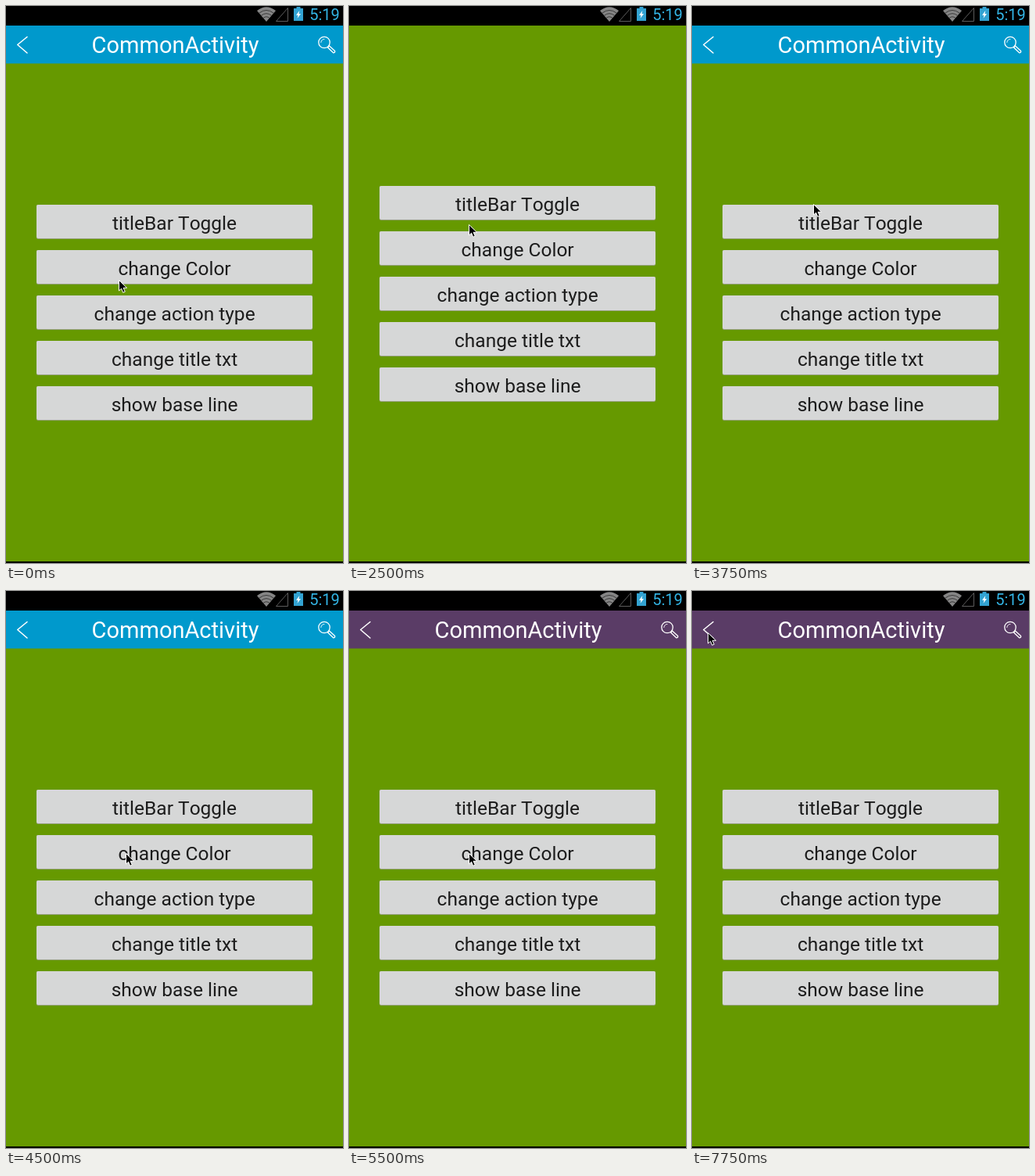
These frames come from a looping animation (431 px wide and 712 px high, 8000 ms). An HTML page:

```html
<!DOCTYPE html>
<html lang="en">
<head>
<meta charset="utf-8">
<title>Title bar demo</title>
<style>
  html, body { margin: 0; width: 100%; height: 100%; overflow: hidden; background: #000; }
  svg { display: block; width: 431px; height: 712px; }
  text { font-family: Roboto, sans-serif; font-kerning: none; text-anchor: middle; }
  .line { fill: none; stroke: #fff; stroke-linecap: round; stroke-linejoin: round; }
</style>
</head>
<body>
<svg viewBox="0 0 431 712">
  <rect width="431" height="712" fill="#000"/>
  <rect y="25" width="431" height="685" fill="#690"/>

  <g id="status">
    <path d="M333 20 L321 6 Q333 -3.5 345 6 Z" fill="#858585"/>
    <g id="waves" fill="none" stroke="#333" stroke-width="0.9"></g>
    <path d="M345.5 19.5 H360.5 V2.5 Z" fill="none" stroke="#5c5c5c"/>
    <path d="M371.5 1 h5 v2 h3.5 v16 h-12 v-16 h3.5 z" fill="#33a3d2"/>
    <path d="M375.3 6 L371 11.7 H373.5 L372.6 15.8 L377 10 H374.5 Z" fill="#fff"/>
    <text x="407.5" y="18" font-size="20" fill="#33b5e5">5:19</text>
  </g>

  <g id="bar">
    <rect id="fill" y="25" width="431" height="48.5"/>
    <path class="line" stroke-width="1.6" d="M27 39.5 L14.8 49.5 L27 60"/>
    <text x="216.5" y="60" font-size="29" fill="#fff">CommonActivity</text>
    <g class="line" stroke-width="1.3">
      <circle cx="407" cy="46.5" r="7.2"/>
      <path d="M402.8 46.5 A4.2 4.2 0 0 1 407 42.3" stroke-width="0.9"/>
      <path d="M411.5 53 L413.5 51 L420.6 57.5 Q421 59.8 418.6 59.8 Z"/>
    </g>
  </g>

  <g id="list"></g>

  <path id="cursor" d="M0.5 0.5 V14 L3.6 11.2 L5.7 16.3 L8.3 15.2 L6.1 10.3 H10.6 Z"
        fill="#000" stroke="#fff"/>
</svg>
<script>
const LOOP = 8000, TICK = 250;
const $ = id => document.getElementById(id);

// Fan stripes shrink evenly towards the apex.
$('waves').innerHTML = [1, 2, 3].map(i => {
  const half = 12 - 2.7 * i, y = 6 + 3.1 * i;
  return `<path d="M${333 - half} ${y} Q333 ${y - half * 0.78} ${333 + half} ${y}"/>`;
}).join('');

const labels = ['titleBar Toggle', 'change Color', 'change action type', 'change title txt', 'show base line'];
$('list').innerHTML = labels.map((label, i) => {
  const y = 254 + i * 58;
  return `<rect x="39" y="${y}" width="353" height="44" rx="2" fill="#96a07d"/>
    <rect x="39" y="${y}" width="353" height="43" rx="2" fill="#d6d7d7"/>
    <text x="215.6" y="${y + 32}" font-size="24.5" fill="#1c1c1c">${label}</text>`;
}).join('');

const easeIn = u => u ** 1.6;
const easeOut = u => 1 - (1 - u) ** 2;
const easeInOut = u => u ** 3 / (u ** 3 + (1 - u) ** 3);

// The pointer glides to each spot and rests there until the next leg.
const home = { x: 144, y: 350 };
const legs = [
  { start: 250, end: 1000, x: 152, y: 265, ease: easeInOut },
  { start: 1000, end: 1250, x: 153, y: 279, ease: easeOut },
  { start: 2750, end: 3250, x: 155, y: 253, ease: easeInOut },
  { start: 3750, end: 4500, x: 153, y: 335, ease: easeOut },
  { start: 6500, end: 7250, x: 42, y: 48, ease: easeIn },
  { start: 7250, end: 7750, x: 20, y: 53, ease: easeOut }
];

function pointerAt(t) {
  let { x, y } = home;
  for (const leg of legs) {
    const u = leg.ease(Math.min(1, Math.max(0, (t - leg.start) / (leg.end - leg.start))));
    x += (leg.x - x) * u;
    y += (leg.y - y) * u;
  }
  return [Math.round(x), Math.round(y)];
}

function draw(now) {
  const t = Math.floor(now % LOOP / TICK) * TICK;
  const hidden = t >= 2500 && t < 3750;
  $('bar').setAttribute('visibility', hidden ? 'hidden' : 'visible');
  $('list').setAttribute('transform', `translate(0 ${hidden ? -24 : 0})`);
  $('fill').setAttribute('fill', t < 4750 ? '#0099cc' : t < 5500 ? '#9900f5' : '#5a3c66');
  $('cursor').setAttribute('transform', `translate(${pointerAt(t)})`);
}

const began = performance.now();
function loop() {
  draw(performance.now() - began);
  requestAnimationFrame(loop);
}
loop();
</script>
</body>
</html>
```
